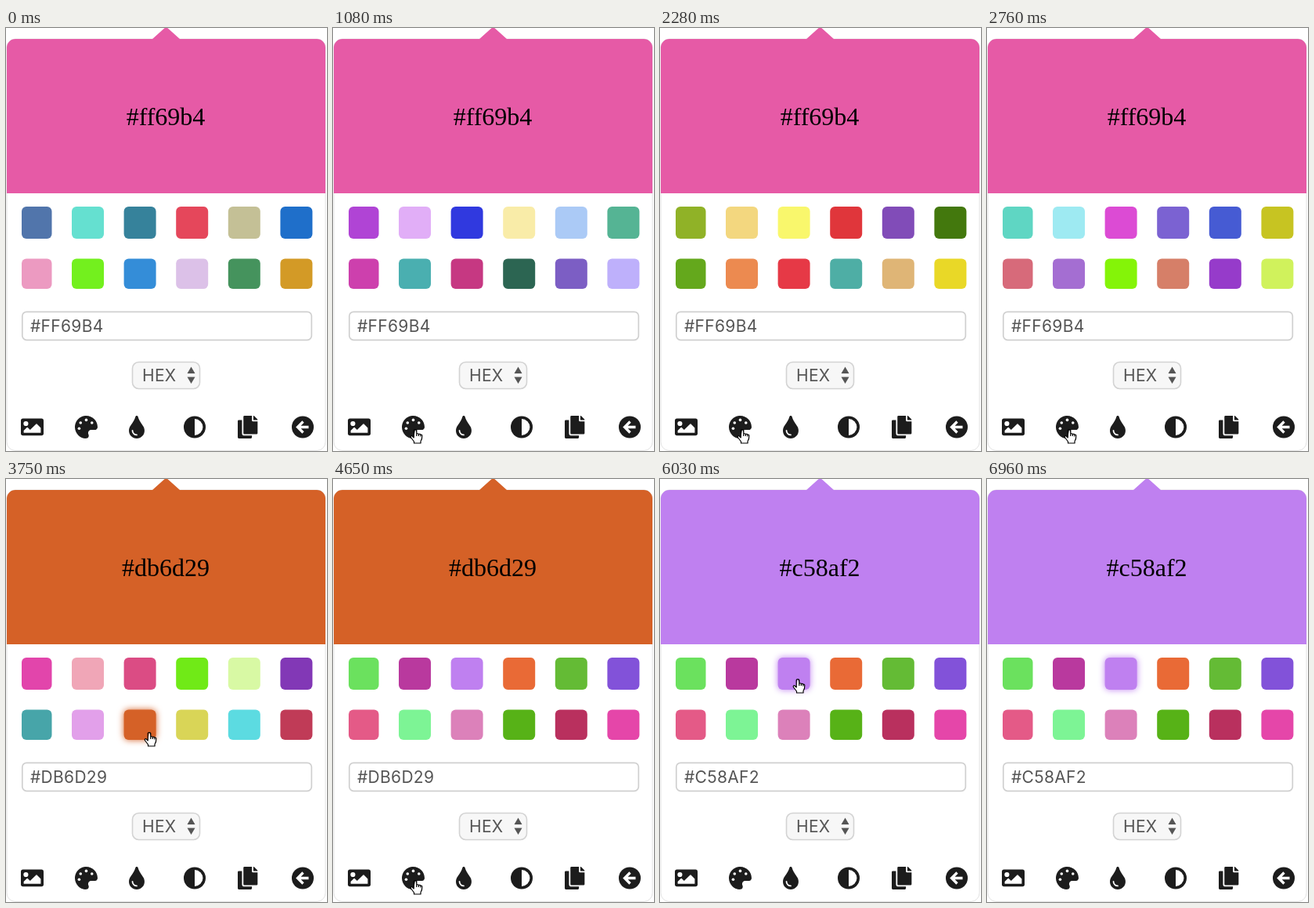
An HTML page for the animation above (6990 ms loop, 410 px wide and 540 px high).

```html
<!DOCTYPE html>
<html lang="en">
<head>
<meta charset="utf-8">
<title>Colour picker</title>
<style>
html, body { margin: 0; width: 100%; height: 100%; overflow: hidden; background: #fff; }
svg { display: block; }
.title { font: 32px "Liberation Serif", Times, serif; text-anchor: middle; }
.field { font: 21px Inter, Roboto, sans-serif; letter-spacing: .3px; fill: #555; }
.icons { fill: #1c1c1c; }
.cut { fill: #fff; }
</style>
</head>
<body>
<svg width="410" height="540" viewBox="0 0 410 540">
  <rect x="1" y="14" width="407" height="525.5" rx="11" fill="#fff" stroke="#e2e2e2"/>
  <path id="header" d="M1 211V25a11 11 0 0 1 11-11H187L201.5 1Q204.500-2 207.500 1L222 14H397a11 11 0 0 1 11 11V211Z"/>
  <text id="title" class="title" x="204" y="124"></text>
  <g id="swatches"></g>

  <rect x="20.800" y="362.300" width="369.500" height="36" rx="5.500" fill="#fff" stroke="#d0d0d0" stroke-width="1.700"/>
  <text id="value" class="field" x="31" y="387.500"></text>
  <rect x="161.500" y="426.500" width="86" height="34" rx="8" fill="#f7f7f7" stroke="#d3d3d3" stroke-width="1.600"/>
  <text class="field" x="174" y="451">HEX</text>
  <path d="M231.500 441L236.500 432.500L241.500 441ZM231.500 445.500L236.500 454L241.500 445.500Z" fill="#555"/>

  <g class="icons">
    <g transform="translate(19 495)">
      <rect y="3.600" width="29" height="21.600" rx="2.700"/>
      <circle class="cut" cx="6.400" cy="10" r="3.100"/>
      <path class="cut" d="M3.600 21.700V19L7.700 14.900Q8.200 14.500 8.700 14.900L11.800 18.100L19.500 10.400Q20 10 20.500 10.400L25.400 15.400V21.700Z"/>
    </g>
    <g transform="translate(88 495) scale(.0566)">
      <path d="M204 5C105 24 25 104 5 203C-32 390 137 530 264 510C305 504 325 456 306 418C283 373 316 320 367 320H447C483 320 512 290 512 255C511 97 368-27 204 5Z"/>
      <g class="cut">
        <circle cx="96" cy="288" r="32"/><circle cx="128" cy="160" r="32"/>
        <circle cx="256" cy="96" r="32"/><circle cx="384" cy="160" r="32"/>
      </g>
    </g>
    <g transform="translate(157 495) scale(.0566)">
      <path d="M205 22C197-7 156-8 147 22C100 180 0 223 0 334C0 432 79 512 176 512S352 432 352 334C352 222 252 181 205 22Z"/>
      <path d="M80 336A96 96 0 0 0 176 432" fill="none" stroke="#fff" stroke-width="32" stroke-linecap="round"/>
    </g>
    <circle cx="241" cy="509.500" r="14"/>
    <path class="cut" d="M241 499.100a10.400 10.400 0 0 1 0 20.800Z"/>
    <g transform="translate(296 495) scale(.0566)">
      <path d="M320 448V488Q320 512 296 512H24Q0 512 0 488V120Q0 96 24 96H96V392Q96 448 152 448Z"/>
      <path d="M320 104V0H152Q128 0 128 24V392Q128 416 152 416H424Q448 416 448 392V128H344Q320 128 320 104Z"/>
      <path d="M352 0H358Q368 0 375 7L441 73Q448 80 448 90V96H352Z"/>
    </g>
    <circle cx="379" cy="509.500" r="14"/>
    <path d="M379.500 502.500L372.500 509.500L379.500 516.500M373.500 509.500H386.500" fill="none" stroke="#fff" stroke-width="3.300"/>
  </g>

  <g id="cursor" stroke-linejoin="round">
    <path id="hand" d="M-1.800 10V1.500Q-1.800-.5 0-.5T1.800 1.500V6Q2-1 0 0M-1.800 10L-3.800 8Q-6 7-5.700 9.500L-1.500 15V17H7V14.500Q9 12 8.800 7.500Q8.500 5.800 6.800 6.300Q6.300 4.800 4.400 5.500Q3.800 4.300 1.800 5V1.500Q1.800-.5 0-.5T-1.800 1.500ZM1.800 5V8M4.400 5.500V8M6.800 6.300V8.500" fill="#fff" stroke="#000" stroke-width="1.200"/>
    <path id="arrow" d="M0 0V14.500L3.300 11.500L5.700 17L8.300 15.800L6 10.500H10.500Z" fill="#000" stroke="#fff" stroke-width="1.200"/>
  </g>
</svg>
<script>
const LOOP = 6990;
const $ = id => document.getElementById(id);

// [start time, twelve swatch colours]
const palettes = [
  [0, "5175ab 65e0d0 36829b e5475b c4c096 1f6fca ec9ac1 73f01e 348dd8 dcc1e8 45935d d39a26"],
  [950, "b044d5 e1aef7 3039df f9eca8 abcaf6 55b494 cd40ad 4aafb0 c63882 2c6552 7c5ec4 beb0fb"],
  [1600, "90b227 f3d77f f9f76c e0363b 814cb8 43780d 64a81c ec8a50 e63946 4eaea5 dfb576 e9d827"],
  [2350, "5fd6c3 9eeaf2 dc4bd4 7b62d2 465bd3 c7c422 d76a7a a46ed2 84f408 d67f68 963bca d0f25c"],
  [3000, "e245ab f0a6b7 db4c84 70ea17 d8f9a4 8238b6 47a5a9 e2a0ea d56127 d9d557 5cdbe1 c03b57"],
  [4550, "6be15e b9399e bf80f0 e96a36 64bb35 8252d9 e45a87 7df495 dc81ba 57b217 b9305e e546a9"]
].map(([t, list]) => [t, list.split(" ").map(c => "#" + c)]);

// [time, label, shown colour, chosen swatch]
const picks = [
  [0, "#ff69b4", "#e65aa6", -1],
  [3680, "#db6d29", "#d56127", 8],
  [5680, "#c58af2", "#bf80f0", 2]
];

// [time, x, y] of the pointer tip
const path = [
  [0, 130, 560], [550, 130, 560], [820, 105, 513], [3150, 105, 513],
  [3550, 183, 324], [3850, 183, 324], [4200, 105, 513], [4850, 105, 513],
  [5300, 187, 280], [5470, 187, 280], [5600, 176, 256], [6510, 176, 256],
  [6850, 430, 315], [LOOP, 430, 315]
];

const swatches = Array.from({ length: 12 }, (_, i) => {
  const col = i % 6, low = i > 5;
  const box = {
    x: col ? 84 + 66.6 * (col - 1) : 20, y: low ? 294.5 : 228,
    width: col ? 41 : 38.5, height: low ? 38.5 : 41, rx: 6
  };
  const el = document.createElementNS("http://www.w3.org/2000/svg", "rect");
  for (const key in box) el.setAttribute(key, box[key]);
  $("swatches").append(el);
  return { el, ...box };
});

const latest = (list, t) => list.filter(item => item[0] <= t).pop();

function pointer(t) {
  const i = path.findIndex(p => p[0] > t);
  const [t0, x0, y0] = path[i - 1], [t1, x1, y1] = path[i];
  const u = (t - t0) / (t1 - t0), e = u * u * (3 - 2 * u);
  return [x0 + (x1 - x0) * e, y0 + (y1 - y0) * e];
}

function draw(now) {
  const t = now % LOOP;
  const [changed, colors] = latest(palettes, t);
  const [picked, label, shown, chosen] = latest(picks, t);
  const [x, y] = pointer(t);
  const hovered = swatches.findIndex(s =>
    x >= s.x && x <= s.x + s.width && y >= s.y && y <= s.y + s.height);

  $("header").setAttribute("fill", shown);
  $("title").textContent = label;
  $("value").textContent = label.toUpperCase();
  swatches.forEach(({ el }, i) => {
    const glow = i === hovered || (i === chosen && picked > changed);
    el.style.fill = colors[i];
    el.style.filter = glow ? `drop-shadow(0 0 4px ${colors[i]})` : "none";
  });

  const clickable = hovered >= 0 || (y > 495 && y < 524 && x > 88 && x < 117);
  $("cursor").setAttribute("transform", `translate(${x} ${y})`);
  $("hand").style.display = clickable ? "" : "none";
  $("arrow").style.display = clickable ? "none" : "";
  requestAnimationFrame(draw);
}
draw(performance.now());
</script>
</body>
</html>
```
